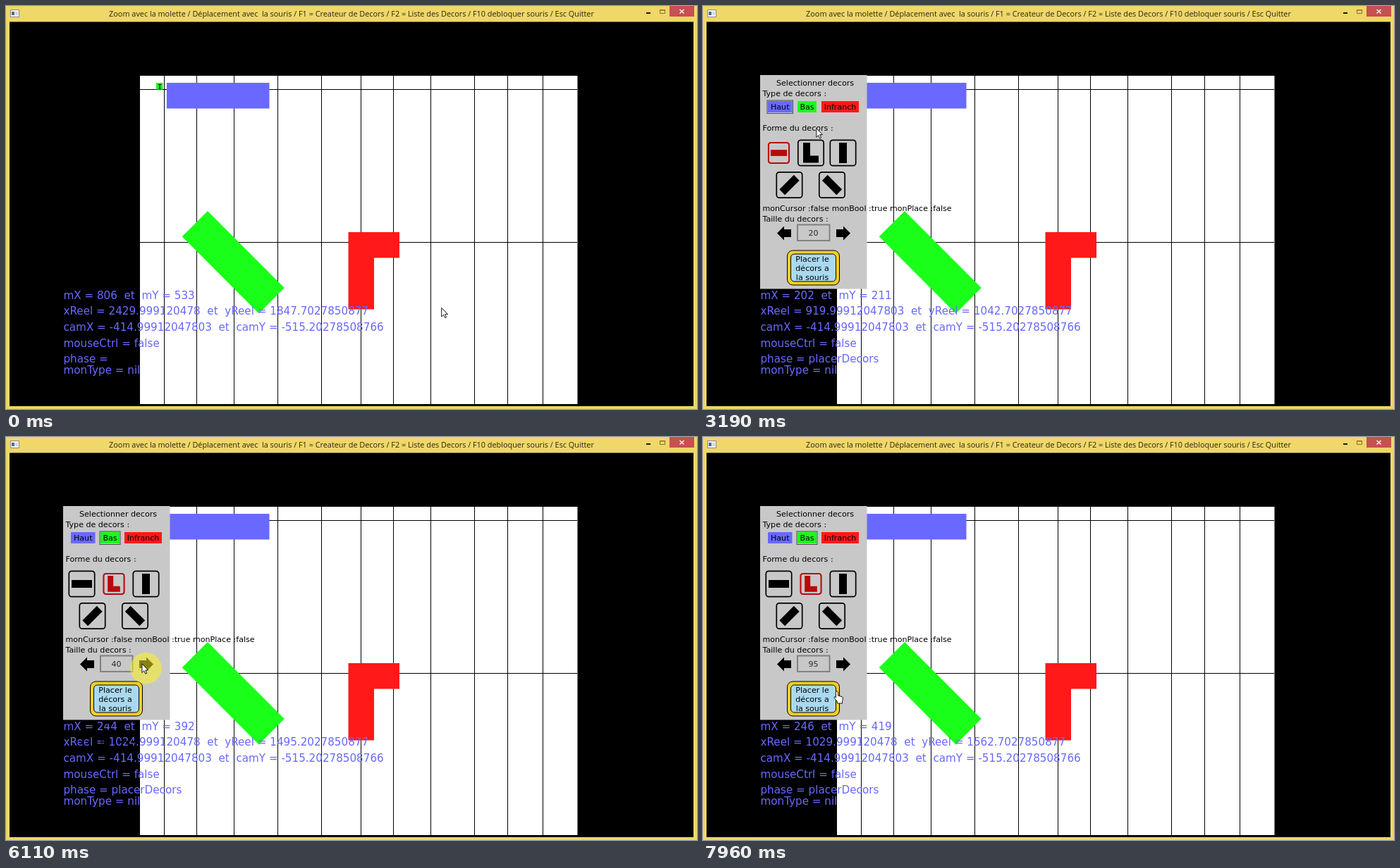
An HTML page that plays this animation: 980 px wide and 572 px high, repeating every 8000 ms.

```html
<!DOCTYPE html>
<html lang="fr">
<head>
<meta charset="utf-8">
<title>Decors</title>
<style>
  html, body { margin: 0; width: 100%; height: 100%; overflow: hidden; background: #000; }
  svg { display: block; width: 980px; height: 572px; }
  text { white-space: pre; font-family: "DejaVu Sans", sans-serif; }
  .title { font: 10.86px "Open Sans", sans-serif; fill: #2a2612; }
  .info text { font-size: 15.16px; fill: #6969ff; }
  .panel text { font-size: 11.09px; fill: #000; }
  .mid { text-anchor: middle; }
  .ink { fill: #fff; stroke: #000; stroke-width: .9; stroke-linejoin: round; }
</style>
</head>
<body>
<svg id="stage" viewBox="0 0 980 572"></svg>
<script>
const LOOP = 8000, STEP = 75, LAG = 70, SCALE = 0.756;
const CAM = { x: -414.99912047803, y: -515.20278508766 };
const BLUE = "#6969ff", GREEN = "#1aff1a", RED = "#ff1919", GREY = "#c8c8c8";

const OPEN = 1730, PICK_LOW = 3620, PICK_ELL = 4700;
const TAP = { start: 5475, period: 2 * STEP, max: 15 };

// Eased pointer moves between resting points
const HOME = { x: 617.4, y: 428.05 };
const MOVES = [
  { from: 230, to: 1020, x: 439, y: 326 },
  { from: 1765, to: 2445, x: 165, y: 253 },
  { from: 2540, to: 3450, x: 159, y: 146 },
  { from: 3864, to: 4293, x: 164.7, y: 212 },
  { from: 4840, to: 5430, x: 192.6, y: 321.5 },
  { from: 7100, to: 7200, x: 192.6, y: 322.2 },
  { from: 7791, to: 7972, x: 195.6, y: 362.5 }
];

const rect = (x, y, w, h, fill, more = "") =>
  `<rect x="${x}" y="${y}" width="${w}" height="${h}" fill="${fill}" ${more}/>`;
const label = (x, y, s, more = "") => `<text x="${x}" y="${y}" ${more}>${s}</text>`;
const lines = (d, color = "#000", w = 1) =>
  `<path d="${d}" fill="none" stroke="${color}" stroke-width="${w}"/>`;

function windowFrame() {
  const title = "Zoom avec la molette / Déplacement avec  la souris / F1 = Createur de Decors" +
    " / F2 = Liste des Decors / F10 debloquer souris / Esc Quitter";
  return rect(0, 0, 980, 572, "#efd769") +
    rect(5, 22.5, 970, 545.5, "#000") +
    rect(6.5, 5.5, 12, 10, "#f4f4f4", 'stroke="#8d8d85"') +
    rect(8, 8, 4, 5, "#4d6f91") + rect(13, 8, 4, 5, "#d5dade") +
    label(490, 15, title, 'class="title mid"') +
    rect(908, 9, 6, 2, "#1c1a10") +
    lines("M927.5 5.5h7v5h-7zM927 6h8", "#8a6f25") +
    rect(941, 0, 35, 15, "#c75050") +
    lines("M955.5 5l6 5.6M961.5 5l-6 5.6", "#fff", 1.4);
}

function world() {
  const cols = [224, 270, 323, 385, 447, 503, 549, 602, 664, 711, 761];
  const grid = cols.map(x => `M${x + .5} 99V565`).join("") + "M190 118.5H810M190 335.5H810";
  return rect(190, 99, 620.5, 466, "#fff") + lines(grid) +
    rect(213, 109, 9.5, 9.5, GREEN) + lines("M216 111.5h4M218 111.5v5.5M216.5 117h3", "#000", 1.1) +
    rect(228, 109, 145.5, 36.5, BLUE) +
    `<path fill="${GREEN}" d="M286 291L394.8 400L358.6 436.4L249.7 327.3z"/>` +
    `<path fill="${RED}" d="M485.5 321h72.5v36.5h-36v73h-36.5z"/>`;
}

function typeButton(x, w, name, fill, on) {
  const ring = on ? rect(x - 1, 134, w + 2, 18.5, GREY, 'stroke="#4c4c4c"') : "";
  return ring + rect(x, 135, w, 16, fill) + label(x + w / 2, 147, name, 'class="mid"');
}

function shapeButton(x, y, d, turn, on) {
  const color = on ? "#b80a0a" : "#000";
  return `<g transform="translate(${x} ${y}) scale(${on ? .8 : 1})">` +
    rect(-18.2, -18.2, 36.4, 36.4, "none", `rx="4" stroke="${color}" stroke-width="${on ? 2.6 : 1.7}"`) +
    `<path d="${d}" fill="${color}" transform="rotate(${turn})"/></g>`;
}

function panel(s) {
  const bar = "M-14.5-5.5h29v11h-29z", ell = "M-11-14.5h10v18.5h12v10h-22z";
  const arrow = "M-10 0L0-10V-5.5H10V5.5H0V10z";
  return rect(81, 98, 151.5, 303.5, GREY) +
    label(104, 113, "Selectionner decors") +
    label(84.5, 128, "Type de decors :") +
    typeButton(92, 34.5, "Haut", BLUE, !s.low) +
    typeButton(134, 27, "Bas", GREEN, s.low) +
    typeButton(168, 53, "Infranch", RED, false) +
    label(84.5, 177, "Forme du decors :") +
    shapeButton(107.5, 208.5, bar, 0, !s.ell) +
    shapeButton(153, 208.5, ell, 0, s.ell) +
    shapeButton(198.5, 208.5, bar, 90, false) +
    shapeButton(122.5, 254, bar, -45, false) +
    shapeButton(183, 254, bar, 45, false) +
    label(84.5, 291, `monCursor :${s.over} monBool :true monPlace :false`) +
    label(84.5, 306, "Taille du decors :") +
    `<path d="${arrow}" transform="translate(115 322.5)"/>` +
    `<path d="${arrow}" transform="translate(199 322.5) scale(-1 1)"/>` +
    rect(134, 310.5, 45.5, 22.5, "none", 'stroke="#7a7a7a" stroke-width="1.8"') +
    label(156.5, 326, s.size, 'class="mid" style="fill:#2b2b2b"') +
    rect(119.5, 347, 74, 49, "#f2d024", 'rx="8" stroke="#000"') +
    rect(124.5, 352, 64, 39, "#aad9ef", 'rx="5" stroke="#000"') +
    ["Placer le", "décors a", "la souris"]
      .map((row, i) => label(155, 363 + 13 * i, row, 'class="mid"')).join("");
}

const number = v => String(+v.toPrecision(14));

function info(s) {
  const mx = Math.round((s.mouse.x - 8.1) / SCALE), my = Math.round((s.mouse.y - 25.1) / SCALE);
  const top = 415.7, gap = 30 * SCALE;
  const rows = [
    `mX = ${mx}  et  mY = ${my}`,
    `xReel = ${number(mx * 2.5 - CAM.x)}  et  yReel = ${number(my * 2.5 - CAM.y)}`,
    `camX = ${CAM.x}  et  camY = ${CAM.y}`,
    "mouseCtrl = false",
    "phase = " + (s.open ? "placerDecors" : "")
  ];
  return rows.map((row, i) => label(81.5, top + gap * i, row)).join("") +
    label(81.5, top + gap * 4 + 20 * SCALE, "monType = nil");
}

// Dark marks over the readout while the size arrow is hovered
const smudge = rect(81, 402, 11, 5.5, "#000") + rect(138, 402, 9, 5, "#000") +
  '<path d="M98 433H186" stroke="#000" stroke-width="3" stroke-dasharray="4 5"/>';

function pointer(s) {
  const { x, y } = s.tip;
  const halo = s.press
    ? `<circle cx="${x + 6}" cy="${y + 6.7}" r="22.3" fill="#fff51c" fill-opacity=".53"/>` : "";
  const shape = s.hand
    ? "M-7.1 1q1.6-2.2 3.2 0v5.2l5.6 1.6q1.6.6 1.3 2.5l-1 4.6v2.3h-7v-2.3l-4.3-5.4q-.6-2 1.2-1.5l1 .9z"
    : "M.3.3V13L3.2 10.3L5.2 14.6L7.1 13.8L5.2 9.4H9z";
  return halo + `<path class="ink" d="${shape}" transform="translate(${x} ${y})"/>`;
}

const smooth = p => p * p * (3 - 2 * p);

function pointerAt(t) {
  let { x, y } = HOME;
  for (const m of MOVES) {
    const p = smooth(Math.max(0, Math.min(1, (t - m.from) / (m.to - m.from))));
    x += (m.x - x) * p;
    y += (m.y - y) * p;
  }
  return { x, y };
}

function stateAt(time) {
  const t = Math.floor(time / STEP) * STEP;
  const beat = (t - TAP.start) / TAP.period;
  const taps = Math.max(0, Math.min(TAP.max, Math.floor(beat)));
  const tapping = beat >= 1 && beat < TAP.max + 1;
  const down = tapping && beat % 1 < .5;
  const clicked = [PICK_LOW, PICK_ELL].some(at => time >= at && time < at + 120);
  const tip = pointerAt(t);
  const onButton = tip.y > 346 && t > TAP.start;
  return {
    tip, mouse: pointerAt(t - LAG),
    open: time >= OPEN, low: time >= PICK_LOW, ell: time >= PICK_ELL,
    size: 20 + 5 * taps,
    over: tapping && !down,
    press: down || clicked,
    hover: t >= 5400 && !onButton,
    hand: onButton
  };
}

const stage = document.getElementById("stage");
stage.innerHTML = windowFrame() + world() +
  '<g class="panel"></g><g class="info"></g><g class="over"></g>';
const [panelLayer, infoLayer, overLayer] =
  [".panel", ".info", ".over"].map(q => stage.querySelector(q));

function draw(t) {
  const s = stateAt(t);
  panelLayer.innerHTML = s.open ? panel(s) : "";
  infoLayer.innerHTML = info(s) + (s.hover ? smudge : "");
  overLayer.innerHTML = pointer(s);
}

const start = performance.now();
function tick() {
  draw((performance.now() - start) % LOOP);
  requestAnimationFrame(tick);
}
tick();
</script>
</body>
</html>
```
